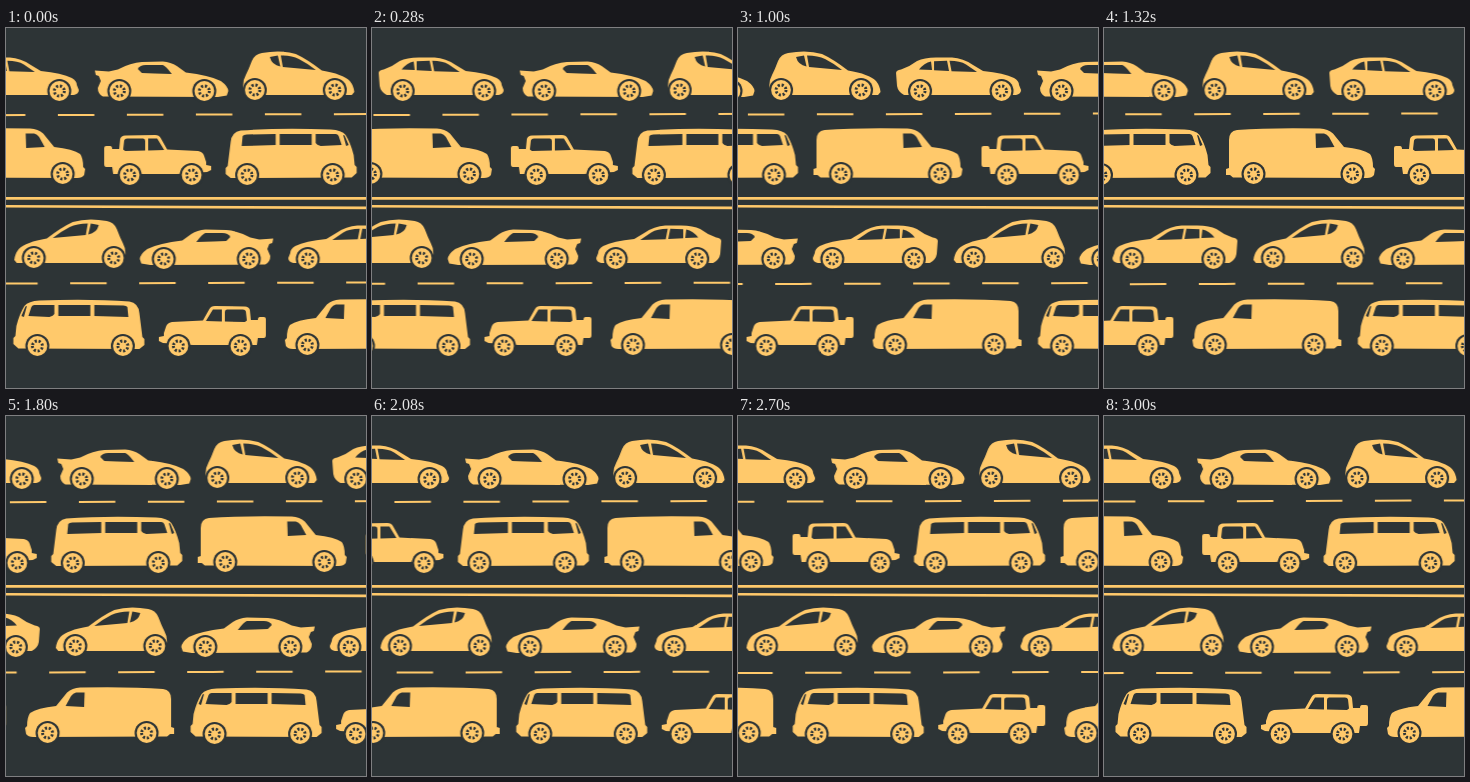
Write an HTML page that moves like this. It is 360x360 px and loops after 3.02 s.

```html
<!DOCTYPE html>
<html lang="en">
<head>
<meta charset="utf-8">
<title>Traffic</title>
<style>
  :root { --road: #2d3436; --paint: #ffc96b; }
  html, body { margin: 0; width: 100%; height: 100%; overflow: hidden; background: var(--road); }
  svg { display: block; width: 100vw; height: 100vh; }
  .body { fill: var(--paint); }
  .glass, .arch { fill: var(--road); }
  .tyre { fill: var(--paint); }
  .spokes { fill: none; stroke: var(--road); stroke-width: 2.9; stroke-dasharray: 2.1 1.827; }
  .line { fill: none; stroke: var(--paint); stroke-width: 2; }
  .dash { stroke-dasharray: 36.5 32.5; }
  .move { animation: roll 3020ms linear infinite; }
  .halt { animation-name: rollAndHalt; }
  @keyframes roll {
    from { transform: translateX(var(--from)); }
    to { transform: translateX(var(--to)); }
  }
  /* halts after 2000 ms */
  @keyframes rollAndHalt {
    0% { transform: translateX(var(--from)); }
    66.225%, 100% { transform: translateX(var(--to)); }
  }
</style>
</head>
<body>
<svg viewBox="0 0 360 360" xmlns="http://www.w3.org/2000/svg">
  <defs>
    <g id="wheel">
      <circle class="arch" r="12"/>
      <circle class="tyre" r="9.9"/>
      <circle class="spokes" r="5"/>
    </g>

    <g id="sedan">
      <path class="body" d="M0 45Q0 42 5 41.500Q13 39 21 33Q28 29.500 40 29.500L56 29.500Q67 30 77 37L87 43Q108 45 118 50Q123 53 123 57L125 62Q125 66 120 67L8 67Q2 64 1 58Z"/>
      <path class="glass" d="M23 41.500Q28 35 35 33.500L36 42ZM38 33.300L51 32.800L53 43L38 42.300ZM53.500 32.800Q64 32.800 70 36.500L81 44L55.500 43.200Z"/>
      <use href="#wheel" x="24" y="63"/>
      <use href="#wheel" x="105.500" y="63"/>
    </g>

    <g id="sports">
      <path class="body" d="M0 42.500L14 43.500L23 41.500Q36 34.500 47 34L68 33.500Q76 34 82 38L91 44.500Q114 47 126 53Q133 58 133.500 63L132 67.500L123 69L8 68.500Q3 66 3 60L6 53L4 48L1 47Z"/>
      <path class="glass" d="M43 41Q45 37 51 37L68 37Q71 38 77 46L60 45.500L47 45Z"/>
      <use href="#wheel" x="24.500" y="63"/>
      <use href="#wheel" x="109.500" y="63"/>
    </g>

    <g id="hatch">
      <path class="body" d="M1 63Q-1 54 3 47Q6 41 9 33Q12 26 19 25Q38 21.500 53 26Q64 31 79 42.500Q100 46 107 53Q111 58 111.500 64L109 67L6 67Z"/>
      <path class="glass" d="M27 29L35 27.500L37.500 38.500Q29 37 27 29ZM38 27.500Q49 27.500 56 31Q64 35 73 42L40 39Z"/>
      <use href="#wheel" x="12" y="62"/>
      <use href="#wheel" x="92" y="62"/>
    </g>

    <g id="van">
      <path class="body" d="M4 140L4 112Q4 103 12 102Q45 99.500 95 100.500Q103 101 108 105.500L119 119Q138 121 145 126Q148 130 148 139L150 141L149 147Q147 150 142 150L8 149.500L5 147L1 147L1 141Z"/>
      <path class="glass" d="M90.500 105.500L99 105.500Q102 106 104 109L109.500 119L91 120Z"/>
      <use href="#wheel" x="28.500" y="146"/>
      <use href="#wheel" x="127.500" y="146"/>
    </g>

    <g id="jeep">
      <path class="body" d="M0 120Q0 118 2 118L6 118Q8 118 8 121L15 121L16 111Q17 107.500 21 107.500L51 107Q55 107 56.500 110L63 121.500L94 123Q99 124 100 128L102 134L102 137L107 138L107 142L103 144L73 146L9 146L8 139L2 139Q0 139 0 136Z"/>
      <path class="glass" d="M19 121.500L20 112.500Q20.500 110.500 23 110.500L39 110.500Q41 110.500 41 113L41 122.500L21 123ZM44 110.500L53 110.500L60 122L44 122.500Z"/>
      <use href="#wheel" x="25.500" y="147"/>
      <use href="#wheel" x="87.500" y="147"/>
    </g>

    <g id="bus">
      <path class="body" d="M2 138L5 114Q6 104 15 102.500Q55 99.500 105 101.500Q116 102 120 107Q125 115 128 127L129 137L131 139L131 145L126 149.500L5 150L0 146L0 140Z"/>
      <path class="glass" d="M17 108Q18 106.500 21 106.500L50 106L50 117L16 118ZM54 106L86 106L86 117L54 117ZM90 106L110 106Q112 106 113 108L116 117L95 118Q91 117 90 115ZM117.500 107L119 107.500L123 117L120.500 118Z"/>
      <use href="#wheel" x="21.500" y="147"/>
      <use href="#wheel" x="107" y="147"/>
    </g>
  </defs>

  <rect width="360" height="360" fill="#2d3436"/>

  <path class="line dash move" style="--from:0px;--to:-543.6px" d="M-17 87.200L1000 84.150"/>
  <path class="line dash move" style="--from:0px;--to:543.6px" d="M-626 257.400L430 254.300"/>
  <path class="body" d="M0 169L360 169L360 171.800L0 171.700ZM0 177L360 178.500L360 181.200L0 179.500Z"/>

  <g id="lanes"></g>
</svg>
<script>
  const NS = "http://www.w3.org/2000/svg";
  const widths = { sedan: 125, sports: 134, hatch: 111.5, van: 150, jeep: 107, bus: 131 };

  // cars: [kind, offset from the first car of the convoy]
  const lanes = [
    { y: 0, period: 416, from: 88.6, to: 509.1, halt: true,
      cars: [["sports", 0], ["hatch", 148], ["sedan", 275]] },
    { y: 0, period: 436, from: 98, to: 536.9,
      cars: [["jeep", 0], ["bus", 121.5], ["van", 267]] },
    { y: 168, period: 415, from: 133.5, to: -281.5, halt: true, left: true,
      cars: [["sports", 0], ["sedan", 149], ["hatch", 290]] },
    { y: 171, period: 437, from: 153, to: -282.8, left: true,
      cars: [["jeep", 0], ["van", 126], ["bus", 291.5]] }
  ];

  function add(parent, tag, attrs) {
    const el = document.createElementNS(NS, tag);
    for (const key in attrs) el.setAttribute(key, attrs[key]);
    return parent.appendChild(el);
  }

  const root = document.getElementById("lanes");
  for (const lane of lanes) {
    const row = add(root, "g", { transform: `translate(0 ${lane.y})` });
    const convoy = add(row, "g", {
      class: lane.halt ? "move halt" : "move",
      style: `--from:${lane.from}px;--to:${lane.to}px`
    });
    const first = lane.left ? -1 : -2;
    for (let k = first; k < first + 3; k++) {
      for (const [kind, offset] of lane.cars) {
        const x = k * lane.period + offset;
        const place = lane.left
          ? `translate(${x + widths[kind]} 0) scale(-1 1)`
          : `translate(${x} 0)`;
        add(convoy, "use", { href: "#" + kind, transform: place });
      }
    }
  }
</script>
</body>
</html>
```
